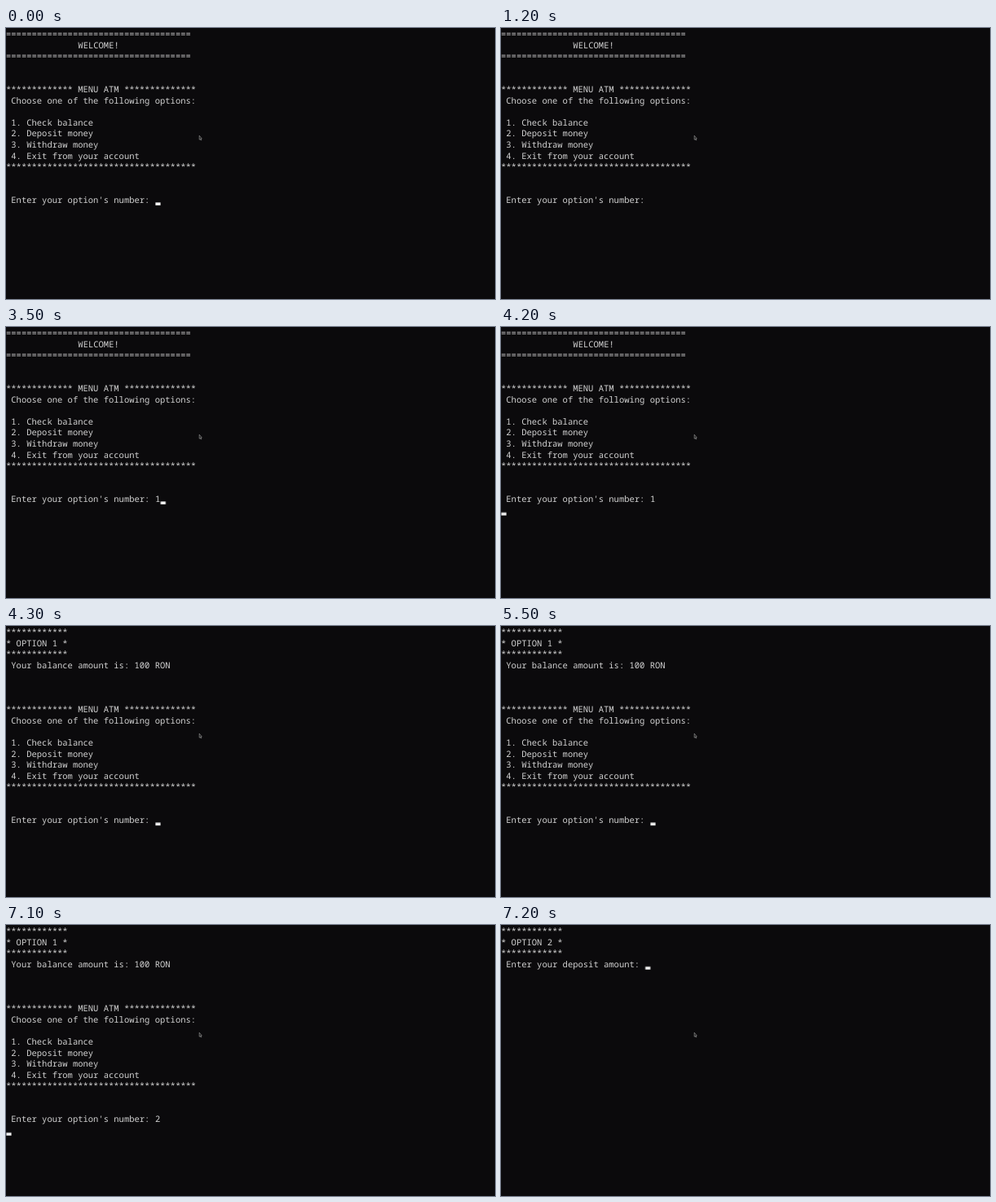
These frames come from a looping animation (600x333 px, 8000 ms). An HTML page:

```html
<!DOCTYPE html>
<html lang="en">
<head>
<meta charset="utf-8">
<title>ATM console</title>
<style>
  html, body { margin: 0; width: 100%; height: 100%; overflow: hidden; background: #0b0a0c; }
  svg { display: block; width: 600px; height: 333px; }
  text {
    font: 10.517px "Noto Sans Mono", "DejaVu Sans Mono", monospace;
    fill: #d2d2d2;
    white-space: pre;
    text-rendering: geometricPrecision;
  }
  .timed { animation: 8s step-end infinite; }
  #welcome { animation-name: welcome; }
  #balance { animation-name: balance; }
  #deposit { animation-name: deposit; }
  #one { animation-name: one; }
  #two { animation-name: two; }
  #cursor { fill: #f6f6f6; animation-name: move, blink; }

  @keyframes welcome { 0% { opacity: 1 } 53.75%, 100% { opacity: 0 } }
  @keyframes balance { 0% { opacity: 0 } 53.75% { opacity: 1 } 90%, 100% { opacity: 0 } }
  @keyframes deposit { 0% { opacity: 0 } 90%, 100% { opacity: 1 } }
  @keyframes one { 0% { opacity: 0 } 43.75%, 100% { opacity: 1 } }
  @keyframes two { 0% { opacity: 0 } 81.25%, 100% { opacity: 1 } }

  /* one column is 6.31px, one row is 13.6px */
  @keyframes move {
    0% { transform: translate(183px, 204px) }
    43.75% { transform: translate(189.3px, 204px) }
    52.5% { transform: translate(0, 217.6px) }
    53.75% { transform: translate(183px, 231.2px) }
    81.25% { transform: translate(189.3px, 231.2px) }
    88.75% { transform: translate(0, 244.8px) }
    90%, 100% { transform: translate(176.7px, 40.8px) }
  }
  @keyframes blink {
    0%, 8.75%, 22.5%, 35%, 43.75%, 52.5%, 68.75%, 81.25%, 100% { opacity: 1 }
    2.5%, 15%, 28.75%, 41.25%, 48.75%, 61.25%, 75% { opacity: 0 }
  }
</style>
</head>
<body>
<svg viewBox="0 0 600 333">
  <g id="welcome" class="timed"><g id="one" class="timed"></g></g>
  <g id="balance" class="timed"><g id="two" class="timed"></g></g>
  <g id="deposit" class="timed"></g>
  <rect id="cursor" class="timed" x="0.4" y="10.4" width="6.2" height="3.5"/>
  <path d="M237.2 132.2v5l1.1-.9.8 1.7.7-.4-.8-1.6h1.3z" fill="#151515" stroke="#a4a4a4" stroke-width=".6"/>
</svg>
<script>
  const COL = 6.31, ROW = 13.6, BASE = 10.9;
  const stars = n => '*'.repeat(n);

  function print(id, row, lines, col = 0) {
    const parent = document.getElementById(id);
    lines.forEach((line, i) => {
      const body = line.trimStart();
      if (!body) return;
      const text = document.createElementNS('http://www.w3.org/2000/svg', 'text');
      text.setAttribute('x', (col + line.length - body.length) * COL);
      text.setAttribute('y', BASE + (row + i) * ROW);
      text.textContent = body;
      parent.append(text);
    });
  }

  const menu = [
    `${stars(13)} MENU ATM ${stars(14)}`,
    ' Choose one of the following options:',
    '',
    ' 1. Check balance',
    ' 2. Deposit money',
    ' 3. Withdraw money',
    ' 4. Exit from your account',
    stars(37),
    '',
    '',
    " Enter your option's number:"
  ];
  const header = n => [stars(12), `* OPTION ${n} *`, stars(12)];
  const rule = '='.repeat(36);

  print('welcome', 0, [rule, ' '.repeat(14) + 'WELCOME!', rule]);
  print('welcome', 5, menu);
  print('one', 15, ['1'], 29);

  print('balance', 0, [...header(1), ' Your balance amount is: 100 RON']);
  print('balance', 7, menu);
  print('two', 17, ['2'], 29);

  print('deposit', 0, [...header(2), ' Enter your deposit amount:']);
</script>
</body>
</html>
```
